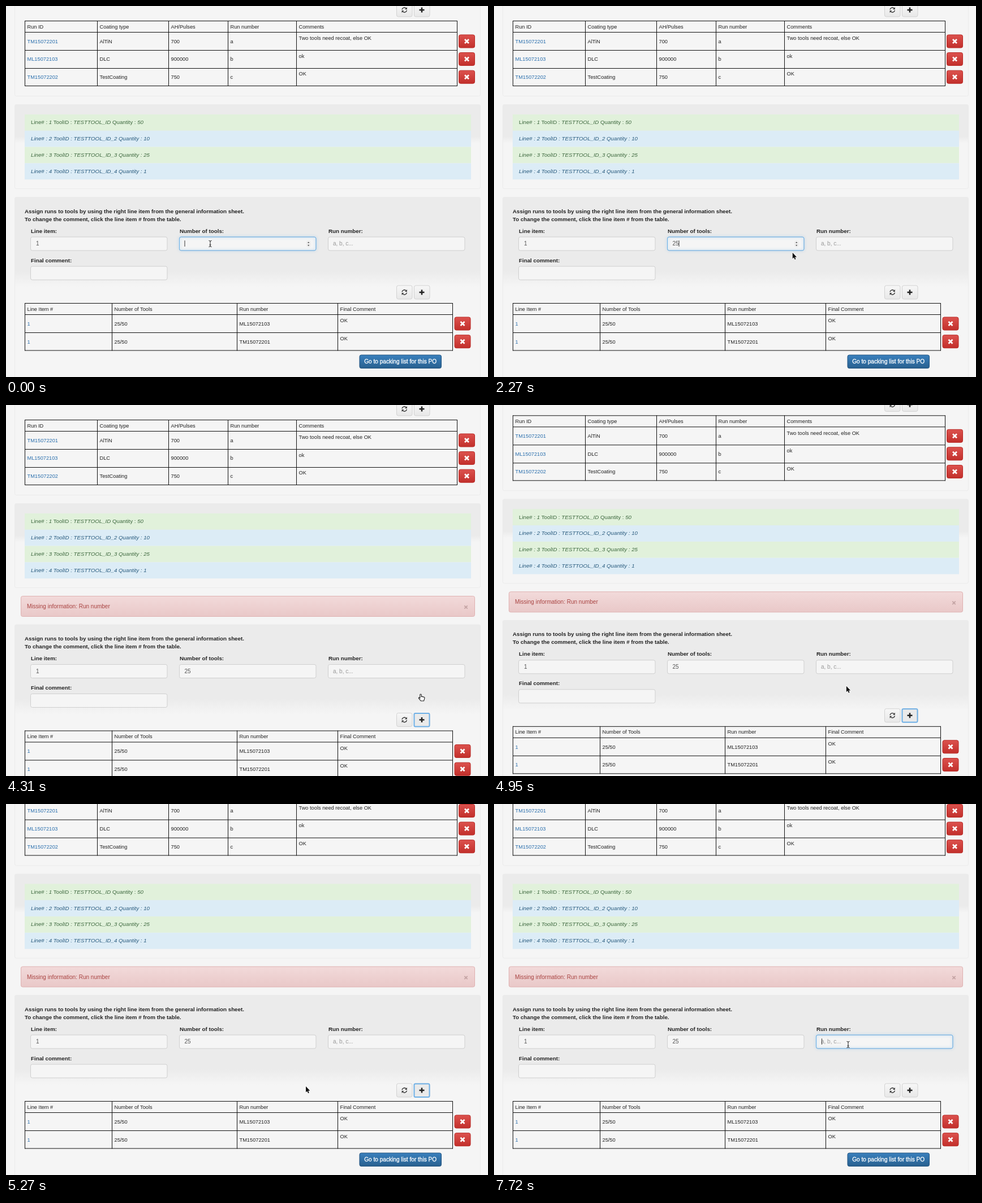
Animation, 852 px wide and 657 px high, one loop 8 s. Source, as an HTML page:

```html
<!DOCTYPE html>
<html lang="en">
<head>
<meta charset="utf-8">
<title>Assign runs</title>
<style>
html, body { margin: 0; width: 100%; height: 100%; overflow: hidden; background: #f5f5f5; }
svg { display: block; width: 852px; height: 657px; font: 10px "Liberation Sans", Arial, sans-serif; }
text { fill: #222; white-space: pre; }
.cell { font-size: 9.25px; }
.link { fill: #2a6fad; }
.bold { font-size: 9.77px; font-weight: bold; }
.line { font-size: 9.7px; }
.green { fill: #3d683e; }
.blue { fill: #285a7d; }
.it { font-style: italic; }
.value { fill: #555; }
.hint { fill: #999; }
.well { fill: url(#well); stroke: #ebebeb; }
.grid { fill: none; stroke: #111; }
.input { fill: #f5f5f5; stroke: #cfcfcf; }
.button { fill: url(#plain); stroke: #d2d2d2; }
.remove { fill: url(#red); stroke: #b92c28; }
.primary { fill: url(#primary); stroke: #245580; }
.label { fill: #fff; stroke: #fff; stroke-width: .3px; font-size: 10.1px; text-anchor: middle; }
.alert { fill: url(#alert); stroke: #dfb1b1; }
.glow { fill: none; stroke: #66afe9; filter: drop-shadow(0 0 2.5px rgba(102,175,233,.8)); }
.ring { fill: #eaeaea; stroke: #6fb0e6; stroke-width: 2; }
.caret { stroke: #333; }
</style>
</head>
<body>
<svg viewBox="0 0 852 657">
  <defs>
    <linearGradient id="well" x2="0" y2="1">
      <stop offset=".38" stop-color="#ebebeb"/><stop offset=".46" stop-color="#f5f5f5"/>
    </linearGradient>
    <linearGradient id="plain" x2="0" y2="1">
      <stop stop-color="#f7f7f7"/><stop offset="1" stop-color="#e8e8e8"/>
    </linearGradient>
    <linearGradient id="red" x2="0" y2="1">
      <stop stop-color="#dc524e"/><stop offset="1" stop-color="#c22f2b"/>
    </linearGradient>
    <linearGradient id="primary" x2="0" y2="1">
      <stop stop-color="#3a80bd"/><stop offset="1" stop-color="#28608f"/>
    </linearGradient>
    <linearGradient id="alert" x2="0" y2="1">
      <stop stop-color="#f2dada"/><stop offset="1" stop-color="#e9c8c8"/>
    </linearGradient>
  </defs>
  <g id="page"><g id="upper"></g><g id="notice"></g><g id="lower"></g></g>
  <g id="cursor">
    <path id="ibeam" fill="none" stroke="#222" d="M-2.5-5.5Q0-5.5 0-4Q0-5.5 2.5-5.5M0-4.5V4.5M-2.5 5.5Q0 5.5 0 4Q0 5.5 2.5 5.5M-1.5 2H1.5"/>
    <path id="arrow" fill="#111" stroke="#fff" stroke-width="1.4" paint-order="stroke" d="M0 0V10.6L2.4 8.4 4 12.2 5.8 11.4 4.2 7.8H7.4z"/>
    <path id="hand" fill="#fff" stroke="#222" stroke-width="1.1" d="M-1.2 1.2a1.2 1.2 0 0 1 2.4 0V4.5Q2.5 3.6 3.4 4.8Q4.6 4.2 5.2 5.3Q7 5 7 6.6L6.3 9.5 5.5 12H.3L-3.6 7.2Q-3.8 5.6-2.4 6L-1.2 7.2z"/>
  </g>
</svg>
<script>
const $ = id => document.getElementById(id);
const LOOP = 8000, ALERT_HEIGHT = 50.5;

const text = (x, y, s, cls = 'cell', id = '') => `<text id="${id}" x="${x}" y="${y}" class="${cls}">${s}</text>`;
const box = (x, y, w, h, cls, r = 3, id = '') =>
  `<rect id="${id}" x="${x}" y="${y}" width="${w}" height="${h}" rx="${r}" class="${cls}"/>`;
const row = (xs, y, cells) => cells.map((s, i) => text(xs[i] + 4, y, s)).join('');

function grid(xs, ys) {
  const [left, right, top, bottom] = [xs[0], xs.at(-1), ys[0], ys.at(-1)];
  const d = xs.map(x => `M${x} ${top}V${bottom}`).join('') + ys.map(y => `M${left} ${y}H${right}`).join('');
  return `<path class="grid" stroke-linecap="square" d="${d}"/>`;
}

function dataRow(xs, y, cells, note, removeX) {
  return text(xs[0] + 4, y + 3.3, cells[0], 'cell link') +
    row(xs.slice(1), y + 3.3, cells.slice(1)) +
    text(xs.at(-2) + 4, y - 2.3, note) +
    box(removeX, y - 11.5, 28, 23, 'remove') +
    `<path transform="translate(${removeX + 14} ${y})" stroke="#fff" stroke-width="2.7" d="M-3.5-3.5L3.5 3.5M3.5-3.5L-3.5 3.5"/>`;
}

function tools(y, ringId = '') {
  const half = 'M-4.2-.6A4.2 4.2 0 0 1 2.6-3.2';
  const tip = 'M4.6-5V-1H.8z';
  const turn = `<path d="${half}" fill="none" stroke="#333" stroke-width="1.4"/><path d="${tip}" fill="#333"/>`;
  return box(690.5, y - 12, 27.5, 24, 'button') + box(721.5, y - 12, 27.5, 24, 'button') +
    (ringId && box(721.5, y - 11.5, 27, 23.5, 'ring', 2, ringId)) +
    `<g transform="translate(704.2 ${y})">${turn}<g transform="rotate(180)">${turn}</g></g>` +
    `<path transform="translate(735 ${y})" stroke="#222" stroke-width="2.5" d="M-4.5 0H4.5M0-4.5V4.5"/>`;
}

const field = (x, y, label) => text(x + .5, y - 7.5, label, 'bold') + box(x, y, 241.5, 24, 'input');

function upper() {
  const xs = [33.5, 161.5, 287.5, 392.5, 513.5, 797.5];
  const it = s => `<tspan class="it">${s}</tspan>`;
  const lines = [
    `Line# : ${it(1)} ToolID : ${it('TESTTOOL_ID')} Quantity : ${it(50)}`,
    ...[10, 25, 1].map((n, i) => it(`Line# : ${i + 2} ToolID : TESTTOOL_ID_${i + 2} Quantity : ${n}`))
  ];
  return `<rect x="15.5" y="-90" width="823" height="249.5" rx="3" fill="#f5f5f5" stroke="#ebebeb"/>` +
    tools(7) + grid(xs, [26.5, 46.5, 78.5, 110.5, 141.5]) +
    row(xs, 39.5, ['Run ID', 'Coating type', 'AH/Pulses', 'Run number', 'Comments']) +
    dataRow(xs, 62.5, ['TM15072201', 'AlTiN', '700', 'a'], 'Two tools need recoat, else OK', 800.5) +
    dataRow(xs, 94, ['ML15072103', 'DLC', '900000', 'b'], 'ok', 800.5) +
    dataRow(xs, 125.7, ['TM15072202', 'TestCoating', '750', 'c'], 'OK', 800.5) +
    box(15.5, 174.5, 823, 149, 'well') +
    lines.map((s, i) => {
      const y = 192 + i * 28.8;
      return `<rect x="33" y="${y}" width="789" height="28.8" fill="${i % 2 ? '#dcecf6' : '#e1f1db'}"/>` +
        text(44, y + 17.3, s, 'line ' + (i % 2 ? 'blue' : 'green'));
    }).join('');
}

function notice() {
  return box(26.5, 338.5, 802, 36, 'alert') +
    `<text x="37" y="360" fill="#a94442" style="fill:#a94442">Missing information: Run number</text>` +
    `<path d="M810.3 355.3l5.4 5.4m0-5.4l-5.4 5.4" stroke="#c3a3a3" stroke-width="1.7"/>`;
}

function lower() {
  const xs = [33.5, 187.5, 408.5, 586.5, 789.5];
  return box(15.5, 338.5, 823, 345, 'well') +
    text(33, 366.5, 'Assign runs to tools by using the right line item from the general information sheet.', 'bold') +
    text(33, 380.5, 'To change the comment, click the line item # from the table.', 'bold') +
    field(43.5, 409, 'Line item:') + field(306.5, 409, 'Number of tools:') +
    field(569.5, 409, 'Run number:') + field(43.5, 461, 'Final comment:') +
    `<g id="countFocus">${box(306.5, 409, 241.5, 24, 'glow')}
      <rect x="531.5" y="416" width="6.5" height="10.5" rx="3" fill="#fafafa" stroke="#ddd" stroke-width=".7"/>
      <path d="M532.7 420L534.7 417.2 536.7 420zM532.7 422.7L534.7 425.5 536.7 422.7z" fill="#666"/></g>` +
    box(569.5, 409, 241.5, 24, 'glow', 3, 'runFocus') +
    text(53, 424.4, '1', 'value') + text(315.5, 424.4, '', 'value', 'count') +
    text(578, 424.4, 'a, b, c...', 'hint') +
    `<path id="caret" class="caret"/>` +
    tools(507, 'plusFocus') + grid(xs, [526.5, 546.5, 578.5, 610]) +
    row(xs, 539.6, ['Line Item #', 'Number of Tools', 'Run number', 'Final Comment']) +
    dataRow(xs, 562.5, ['1', '25/50', 'ML15072103'], 'OK', 793) +
    dataRow(xs, 594.2, ['1', '25/50', 'TM15072201'], 'OK', 793) +
    box(625, 618, 144.5, 23.5, 'primary') + text(697.2, 633.4, 'Go to packing list for this PO', 'label');
}

$('upper').innerHTML = upper();
$('notice').innerHTML = notice();
$('lower').innerHTML = lower();

// Pointer path: time, x, y, shape
const path = [
  [0, 361, 421, 'ibeam'], [1000, 361, 421, 'ibeam'], [1300, 390, 420, 'ibeam'], [1820, 446, 431, 'arrow'],
  [2670, 600, 442, 'arrow'], [2950, 340, 488, 'arrow'], [3260, 550, 534, 'arrow'], [3380, 630, 538, 'arrow'],
  [3490, 692, 525, 'arrow'], [3660, 724, 515, 'hand'], [3770, 733, 512, 'hand'], [4530, 733, 512, 'arrow'],
  [5000, 610, 496, 'arrow'], [5269, 610, 496, 'arrow'], [5270, 530, 500, 'arrow'], [5630, 530, 500, 'arrow'],
  [6090, 204.5, 326.5, 'arrow'], [6250, 192, 318, 'arrow'], [6450, 206, 321, 'arrow'], [7280, 627, 440, 'arrow'],
  [7400, 627, 432, 'ibeam'], [7570, 626, 426, 'ibeam'], [LOOP, 626, 426, 'ibeam']
];
const ramp = (t, a, b) => Math.min(1, Math.max(0, (t - a) / (b - a)));
const show = (id, on) => $(id).setAttribute('opacity', Number(on));
const move = (id, x, y) => $(id).setAttribute('transform', `translate(${x} ${y})`);

function caretX(t) {
  if (t >= 7720) return 579.5;
  if (t < 1020) return t < 510 ? 316 : null;
  if (t < 1200) return 316;
  if (t < 1790) return 321.5;
  return t < 3350 && Math.floor((t - 1790) / 510) % 2 === 0 ? 327 : null;
}

function draw(t) {
  const i = path.findIndex((p, k) => t < path[k + 1][0]);
  const [t0, x0, y0, shape] = path[i], [t1, x1, y1] = path[i + 1];
  const k = ramp(t, t0, t1);
  move('cursor', x0 + (x1 - x0) * k, y0 + (y1 - y0) * k);
  for (const id of ['ibeam', 'arrow', 'hand']) show(id, id === shape);

  const alerted = t >= 4010;
  move('page', 0, t >= 5270 ? -ALERT_HEIGHT : -11.4 * ramp(t, 4850, 5000));
  move('lower', 0, alerted ? ALERT_HEIGHT : 0);
  show('notice', ramp(t, 3960, 4160) * alerted);
  show('countFocus', 1 - ramp(t, 4010, 4160));
  show('plusFocus', alerted && t < 7570);
  show('runFocus', t >= 7720);

  $('count').textContent = t < 1200 ? '' : t < 1790 ? '2' : '25';
  const cx = caretX(t);
  $('caret').setAttribute('d', cx === null ? '' : `M${cx} 415.3V426`);
}

const start = performance.now();
function frame() {
  draw((performance.now() - start) % LOOP);
  requestAnimationFrame(frame);
}
frame();
</script>
</body>
</html>
```
